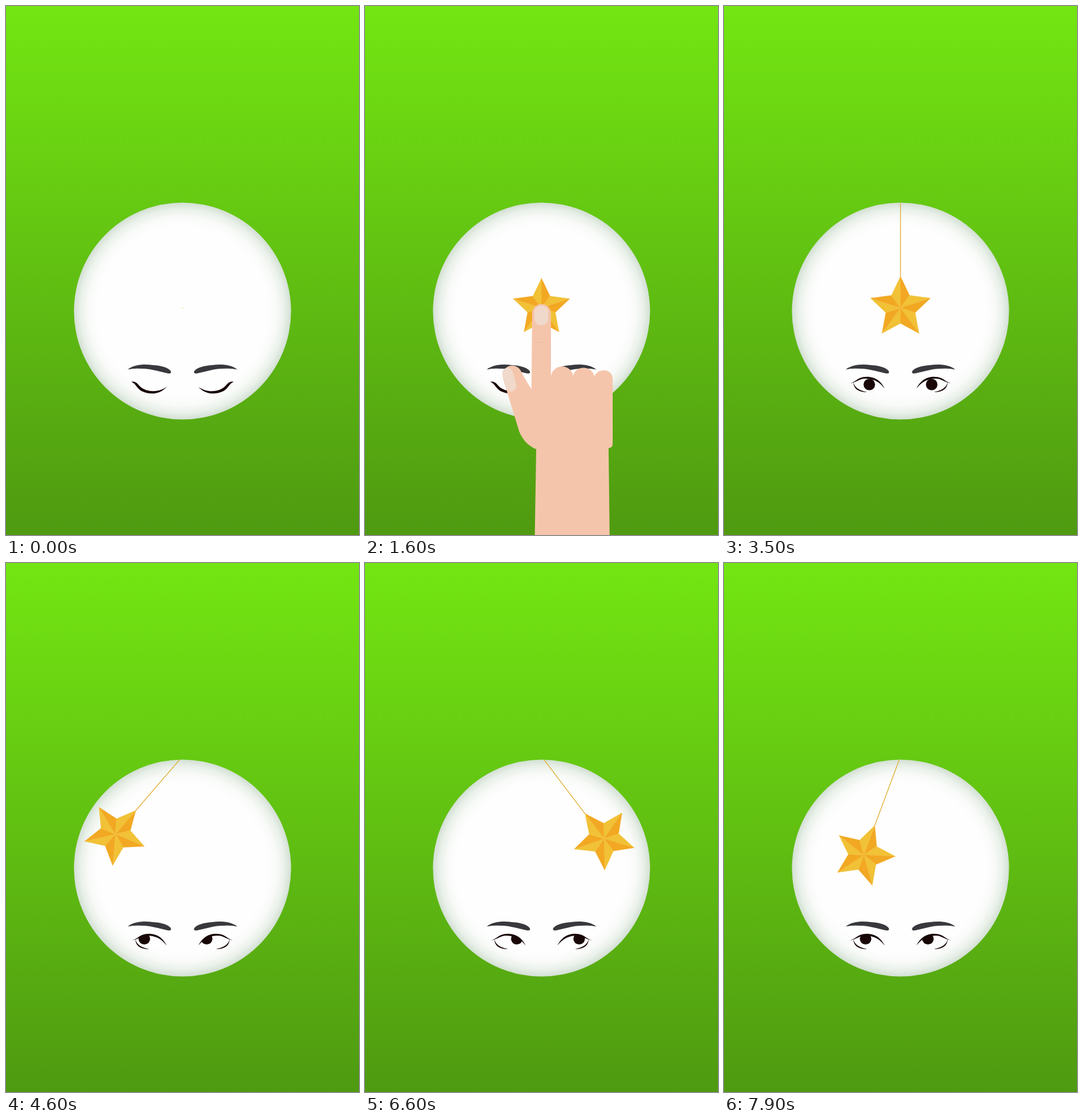
Write an HTML page that moves like this. It is 600x900 px and loops after 8000 ms.

```html
<!DOCTYPE html>
<html lang="en">
<head>
<meta charset="utf-8">
<title>Swinging star</title>
<style>
html, body { margin: 0; width: 100%; height: 100%; overflow: hidden; background: #60c012; }
svg { display: block; width: 100vw; height: 100vh; }
</style>
</head>
<body>
<svg viewBox="0 0 600 900">
  <defs>
    <linearGradient id="grass" x2="0" y2="1">
      <stop stop-color="#73e612"/><stop offset="1" stop-color="#4f9a11"/>
    </linearGradient>
    <radialGradient id="ball">
      <stop offset=".78" stop-color="#fefefe"/><stop offset=".87" stop-color="#f8faf8"/>
      <stop offset=".94" stop-color="#e9f0e9"/><stop offset="1" stop-color="#d3e0d3"/>
    </radialGradient>
    <clipPath id="disc"><circle cx="300" cy="519" r="184.5"/></clipPath>
    <clipPath id="opening"><path id="gap"/></clipPath>
    <path id="brow" fill="#39393d" d="M207 618.5C217 610 234 609 250 611C264 612 275 615 280 621Q282 626 275 625C260 622 247 617 231 617Q217 616 207 618.5Z"/>
    <path id="lid" fill="#190708"/>
    <path id="lash" fill="#190708" d="M220 640C222 650 231 654 243 657C230 657 220 652 220 640Z"/>
  </defs>
  <rect width="600" height="900" fill="url(#grass)"/>
  <circle cx="300" cy="519" r="184.5" fill="url(#ball)"/>
  <g class="eye"></g>
  <g class="eye" transform="matrix(-1 0 0 1 600 0)"></g>
  <g clip-path="url(#disc)"><path id="string" stroke="#e0ad32" stroke-width="1.3"/></g>
  <g id="star"></g>
  <g id="hand">
    <path fill="#f5c5ab" d="M284 523A16 16 0 0 1 316 523V630C320 608 349 608 354 629C358 611 385 611 390 630C396 615 421 616 421 635V744Q421 752 414 752L417 1000H287L291 754C276 748 264 734 260 717L235 635C230 610 257 605 265 621Q276 642 283 652Z"/>
    <rect x="288" y="510" width="23.5" height="33" rx="11" fill="#f0d9ca"/>
    <rect x="236.5" y="615" width="18" height="41" rx="9" fill="#f0d9ca" transform="rotate(-15 246 636)"/>
    <path d="M290 572H310" stroke="#efb99f"/>
  </g>
</svg>
<script>
const $ = id => document.getElementById(id);
const pivot = { x: 300, y: 329 };

// One half of each point is lit, the other shaded
const at = (r, turn) => [r * Math.sin(turn), -r * Math.cos(turn)].map(v => v.toFixed(2));
const step = Math.PI / 5;
let facets = '';
for (let i = 0; i < 10; i++) {
  const tip = i % 2 ? i + 1 : i;
  const dip = i % 2 ? i : i + 1;
  const color = i % 2 ? '#f1c136' : '#f2a822';
  facets += `<path d="M0 0L${at(53.6, tip * step)}L${at(26.3, dip * step)}Z" fill="${color}" stroke="${color}" stroke-width=".3"/>`;
}
$('star').innerHTML = facets;

const eyes = [...document.querySelectorAll('.eye')];
for (const eye of eyes) {
  eye.innerHTML = `<use href="#brow"/><g clip-path="url(#opening)"><circle r="9.8" fill="#190708"/></g>
    <use href="#lash"/><use href="#lid"/>`;
}
const pupils = eyes.map(eye => eye.querySelector('circle'));

const lidShut = 'M213 639C224 638 224 646 233 651C246 658 262 656 273 648C262 661 244 662 230 655C222 650 221 643 213 639Z';
const lidOpen = 'M213 642C221 641 224 636 231 633C247 627 265 633 273 651C264 638 250 633 238 634C229 635 224 641 213 642Z';
const gapShut = 'M221 642C225 660 262 660 273 651C262 660 225 660 221 642Z';
const gapOpen = 'M221 641C230 628 260 626 273 651C262 660 225 660 221 641Z';

const clamp = v => Math.max(0, Math.min(1, v));
const ease = (t, from, to) => {
  const k = clamp((t - from) / (to - from));
  return k * k * (3 - 2 * k);
};

function blend(a, b, k) {
  const ends = b.match(/\d+/g);
  let i = 0;
  return a.replace(/\d+/g, n => +n + (ends[i++] - n) * k);
}

// Smooth curve through [time, value] keys
function curve(keys, t) {
  const last = keys.length - 1;
  if (t <= keys[0][0]) return keys[0][1];
  if (t >= keys[last][0]) return keys[last][1];
  const i = keys.findIndex(key => key[0] > t) - 1;
  const slope = j => {
    if (j === 0) return 0;
    const a = keys[j - 1], b = keys[Math.min(j + 1, last)];
    return (b[1] - a[1]) / (b[0] - a[0]);
  };
  const [t0, v0] = keys[i], [t1, v1] = keys[i + 1];
  const d = t1 - t0, k = (t - t0) / d, k2 = k * k, k3 = k2 * k;
  return (2 * k3 - 3 * k2 + 1) * v0 + (k3 - 2 * k2 + k) * d * slope(i)
    + (3 * k2 - 2 * k3) * v1 + (k3 - k2) * d * slope(i + 1);
}

const swing = [[3600, 0], [4600, 40.8], [4850, 46], [5400, 25.9], [6300, -21],
  [6600, -37.2], [6850, -45], [7200, -26], [7700, 26], [7900, 20.4]];
const reach = [[3600, 184.6], [4600, 174.8], [5400, 173.2], [6600, 175.8], [7900, 179]];

function draw(t) {
  const angle = curve(swing, t), rad = angle * Math.PI / 180;
  const length = curve(reach, t);
  const along = r => [pivot.x - r * Math.sin(rad), pivot.y + r * Math.cos(rad)];

  const press = ease(t, 1450, 1600) * (1 - ease(t, 1700, 1900));
  const scale = (0.02 + 0.98 * ease(t, 0, 900)) * (1 - 0.056 * press);
  $('star').setAttribute('transform', `translate(${along(length)}) rotate(${angle}) scale(${scale})`);

  const drop = ease(t, 2750, 3200);
  $('string').setAttribute('d', `M${along(0)}L${along((length - 53) * drop)}`);
  $('string').setAttribute('opacity', drop ? 1 : 0);

  const away = 1 - ease(t, 950, 1500) + ease(t, 1850, 2400);
  $('hand').setAttribute('transform', `translate(0 ${400 * away})`);

  const open = ease(t, 2900, 3300);
  $('lid').setAttribute('d', blend(lidShut, lidOpen, open));
  $('gap').setAttribute('d', blend(gapShut, gapOpen, open));
  $('lash').setAttribute('opacity', open);

  const look = -18.2 * Math.sin(rad), lift = 4.7 * ease(t, 3600, 4300);
  pupils.forEach((pupil, i) => {
    pupil.setAttribute('cx', 247 + (i ? -look : look));
    pupil.setAttribute('cy', 644 - lift);
  });
}

const start = performance.now();
function frame() {
  const t = (performance.now() - start) % 8000;
  draw(Math.floor(t / 100) * 100);
  requestAnimationFrame(frame);
}
frame();
</script>
</body>
</html>
```
